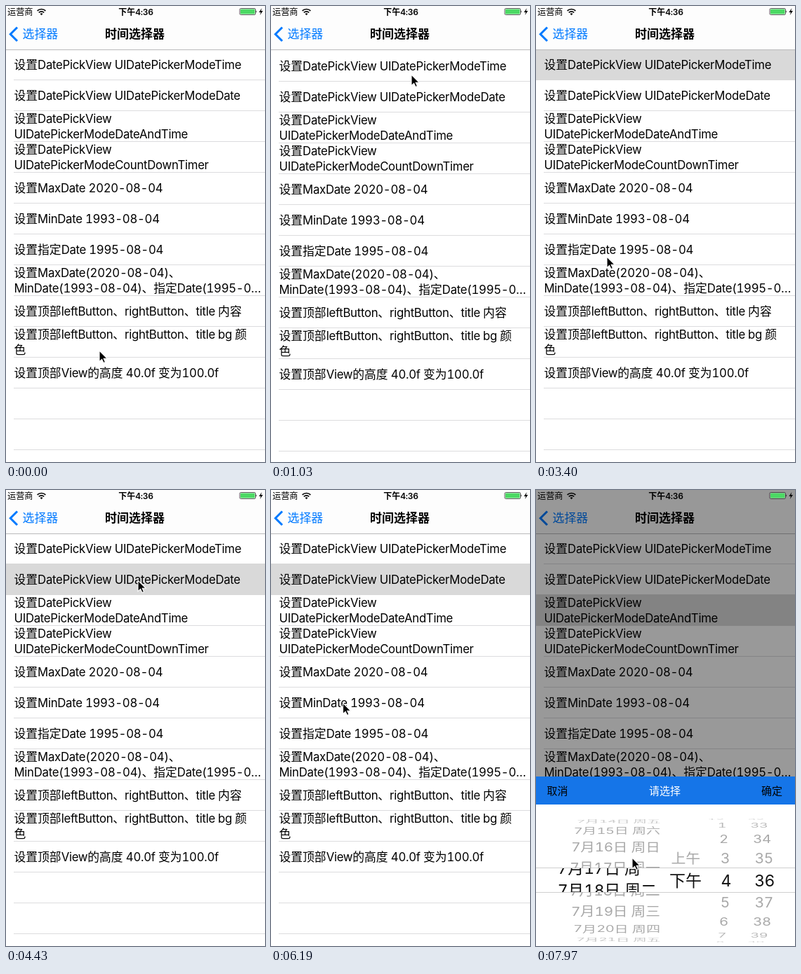
Recreate the animation shown at these times as an HTML page. Size 369 px wide and 651 px high, loop 8000 ms.

```html
<!DOCTYPE html>
<html lang="zh-CN">
<head>
<meta charset="utf-8">
<title>时间选择器</title>
<style>
html, body { margin: 0; width: 369px; height: 651px; overflow: hidden; background: #fff; }
svg { display: block; font-family: Inter, "Noto Sans CJK SC", "Noto Sans CJK", sans-serif; }
text { white-space: pre; font-variant-numeric: tabular-nums; }
.latin { letter-spacing: -.018em; }
</style>
</head>
<body>
<svg id="stage" width="369" height="651" viewBox="0 0 369 651">
  <defs>
    <clipPath id="band"><rect y="540" width="369" height="34"/></clipPath>
    <clipPath id="outside"><path d="M0 468H369V540H0zM0 574H369V647H0z"/></clipPath>
  </defs>
  <g id="table"></g>
  <g id="nav"></g>
  <rect id="shade" width="369" height="651"/>
  <g id="status"></g>
  <g id="sheet"></g>
  <path id="cursor" d="M0-1V14.6L3.6 11.3 6 16.6 8.5 15.5 6.2 10.3H11.2Z" stroke="#fff" stroke-width="1.1"/>
</svg>
<script>
const LOOP = 8000, STEP = 147.6, MID = 184.5;
const el = id => document.getElementById(id);

function label(s, x, y, size, attrs = '') {
  const runs = s.replace(/[ -~…]+/g, r => `<tspan class="latin">${r}</tspan>`);
  return `<text x="${x}" y="${y}" font-size="${size}" ${attrs}>${runs}</text>`;
}

const rows = [
  ['设置DatePickView UIDatePickerModeTime'],
  ['设置DatePickView UIDatePickerModeDate'],
  ['设置DatePickView', 'UIDatePickerModeDateAndTime'],
  ['设置DatePickView', 'UIDatePickerModeCountDownTimer'],
  ['设置MaxDate 2020-08-04'],
  ['设置MinDate 1993-08-04'],
  ['设置指定Date 1995-08-04'],
  ['设置MaxDate(2020-08-04)、', 'MinDate(1993-08-04)、指定Date(1995-0…'],
  ['设置顶部leftButton、rightButton、title 内容'],
  ['设置顶部leftButton、rightButton、title bg 颜', '色'],
  ['设置顶部View的高度 40.0f 变为100.0f']
];

let list = '';
for (let i = 0; i < 13; i++) list += `<rect x="11" y="${105 + 44 * i}" width="358" height="1" fill="#dcdcde"/>`;
list += '<rect id="picked" width="369" height="45" fill="#d9d9d9"/>';
rows.forEach((lines, i) => lines.forEach((s, j) => {
  const y = 90 + 44 * i + (lines.length > 1 ? 22 * j - 11 : 0);
  list += label(s, 11.5, y, 16.8);
}));
el('table').innerHTML = list;

el('nav').innerHTML = `<rect width="369" height="62" fill="#fdfdfd"/>
  <rect y="62" width="369" height="1" fill="#b9b9bb"/>
  <path d="M16 30.5L6.3 40.2 16 50" fill="none" stroke="#007aff" stroke-width="3"/>` +
  label('选择器', 23.5, 46.3, 16.9, 'fill="#007aff"') +
  label('时间选择器', 183.5, 46.3, 17, 'font-weight="600" text-anchor="middle"');

el('status').innerHTML = label('运营商', 2, 12.6, 12.2) +
  label('下午4:36', 185, 12.6, 12, 'font-weight="600" text-anchor="middle"') +
  `<path d="M44.6 6.9a8.4 8.4 0 0 1 11.8 0M46.8 9.4a5.2 5.2 0 0 1 7.4 0" fill="none" stroke="#000" stroke-width="1.6"/>
  <path d="M48.5 11.1a3 3 0 0 1 4 0l-2 2.1z"/>
  <rect x="333" y="3.5" width="22.5" height="9" rx="1.6" fill="#fff" fill-opacity=".3" stroke="#333" stroke-width=".8"/>
  <rect x="334" y="4.4" width="20.5" height="7.2" rx=".8" fill="#4cd964"/>
  <path d="M356.4 6.3q1.6 1.7 0 3.4z"/>
  <path d="M364.4 3l-4 6h2.6l-1.2 4 4.2-6h-2.7z"/>`;

const toolbar = `<rect y="409" width="369" height="242" fill="#fff"/>
  <rect y="409" width="369" height="40" fill="#1575e8"/>` +
  label('取消', 15.5, 434.6, 15) +
  label('请选择', 183.5, 434.6, 15, 'fill="#fff" text-anchor="middle"') +
  label('确定', 321, 434.6, 15) +
  '<path d="M0 539.5H369M0 574.5H369" stroke="#cfcfcf"/>';

// Row labels by index
const wrap = (i, n) => ((i % n) + n) % n;
const halfDay = i => ['上午', '下午'][i] || '';
const hour = i => '' + (wrap(i - 1, 12) + 1);
const minute = i => ('' + wrap(i, 60)).padStart(2, '0');
const year = i => i + '年';
const month = i => wrap(i - 1, 12) + 1 + '月';
const day = i => wrap(i - 1, 31) + 1 + '日';
function dayOfYear(i) {
  if (i === 5) return '今天';
  const d = new Date(Date.UTC(2017, 6, i));
  return `${d.getUTCMonth() + 1}月${d.getUTCDate()}日 周${'日一二三四五六'[d.getUTCDay()]}`;
}

// One wheel column: large text in the band, small grey text on the cylinder
function wheel(text, pos, anchor, bandX, greyX) {
  let big = '', small = '';
  const base = Math.round(pos);
  for (let i = base - 4; i <= base + 4; i++) {
    const angle = (i - pos) * 21 * Math.PI / 180, cos = Math.cos(angle);
    if (cos < .05) continue;
    const y = 557.5 + 88 * Math.sin(angle);
    const s = 1 / (1 + 88 * (1 - cos) / 810);
    const at = `text-anchor="${anchor}"`;
    if (Math.abs(i - pos) < 1.3) big += label(text(i), bandX, y + 8.3, 23, at + ' fill="#111"');
    small += label(text(i), greyX - MID, 7.5, 21,
      `${at} fill="#a8a8a8" opacity="${Math.min(1, .35 + cos)}" transform="translate(${MID} ${y}) scale(${s} ${cos * s})"`);
  }
  return `<g clip-path="url(#outside)">${small}</g><g clip-path="url(#band)">${big}</g>`;
}

// Linear interpolation through keys [step, ...values]
function along(keys, n) {
  const k = keys.findIndex(p => p[0] > n);
  if (k < 0) return keys[keys.length - 1].slice(1);
  if (!k) return keys[0].slice(1);
  const a = keys[k - 1], b = keys[k], f = (n - a[0]) / (b[0] - a[0]);
  return a.slice(1).map((v, i) => v + (b[i + 1] - v) * f);
}

const pointer = [
  [0, 133, 493], [1, 140, 460], [4, 195, 62], [6, 199, 94], [7, 200, 99], [10, 200, 96],
  [15, 209, 365], [16, 188, 480], [17, 150, 497], [18, 90, 470], [20, 34, 438], [22, 34, 438],
  [23, 101, 359], [27, 180, 135], [30, 188, 130], [32, 140, 480], [33, 110, 530], [35, 108, 575],
  [37, 70, 500], [39, 25, 438], [40, 25, 436], [44, 180, 174], [45, 185, 172], [47, 191, 517],
  [49, 150, 590], [51, 138, 530], [54, 137, 526]
];
const bounce = [[4, 0], [5, 8], [6, 14], [7, 2], [8, 0]];
const yearSpin = [[33, 2017], [35, 2016.1], [36, 2016]];
const daySpin = [[49, 5], [50, 6], [51, 9.5], [52, 13], [53, 15.6], [54, 17.55]];

const pickers = [
  { tap: 10, show: 10.2, hide: 21, draw: () =>
    wheel(halfDay, 1, 'middle', 126, 125.5) + wheel(hour, 4, 'end', 198, 195.5) + wheel(minute, 36, 'end', 270, 268) },
  { tap: 29, show: 30.2, hide: 40, draw: n =>
    wheel(year, along(yearSpin, n)[0], 'middle', 107, 106) + wheel(month, 7, 'start', 162, 162) + wheel(day, 5, 'start', 237, 238) },
  { tap: 45, show: 46.19, hide: 99, draw: n =>
    wheel(dayOfYear, along(daySpin, n)[0], 'end', 172, 176.8) + wheel(halfDay, 1, 'middle', 213, 213.5) +
    wheel(hour, 4, 'end', 278, 276.5) + wheel(minute, 36, 'end', 340, 339) }
];

function ease(x) {
  x = Math.max(0, Math.min(1, x));
  return x * x * (3 - 2 * x);
}

function render(n) {
  const active = pickers.filter(p => n >= p.tap).length - 1;
  const picker = pickers[active];
  const open = picker ? ease((n - picker.show) / 2) - ease((n - picker.hide) / 2) : 0;

  el('table').setAttribute('transform', `translate(0 ${along(bounce, n)[0]})`);
  el('picked').setAttribute('y', 61 + 44 * active);
  el('picked').setAttribute('opacity', picker ? 1 : 0);
  el('shade').setAttribute('opacity', .4 * open);
  el('sheet').innerHTML = open > 0 ? toolbar + picker.draw(n) : '';
  el('sheet').setAttribute('transform', `translate(0 ${242 * (1 - open)})`);
  el('cursor').setAttribute('transform', `translate(${along(pointer, n)})`);
}

const start = performance.now();
let last = -1;
function tick() {
  const t = (performance.now() - start) % LOOP;
  const n = Math.floor((t + 10) / STEP);
  if (n !== last) render(last = n);
  requestAnimationFrame(tick);
}
tick();
</script>
</body>
</html>
```
